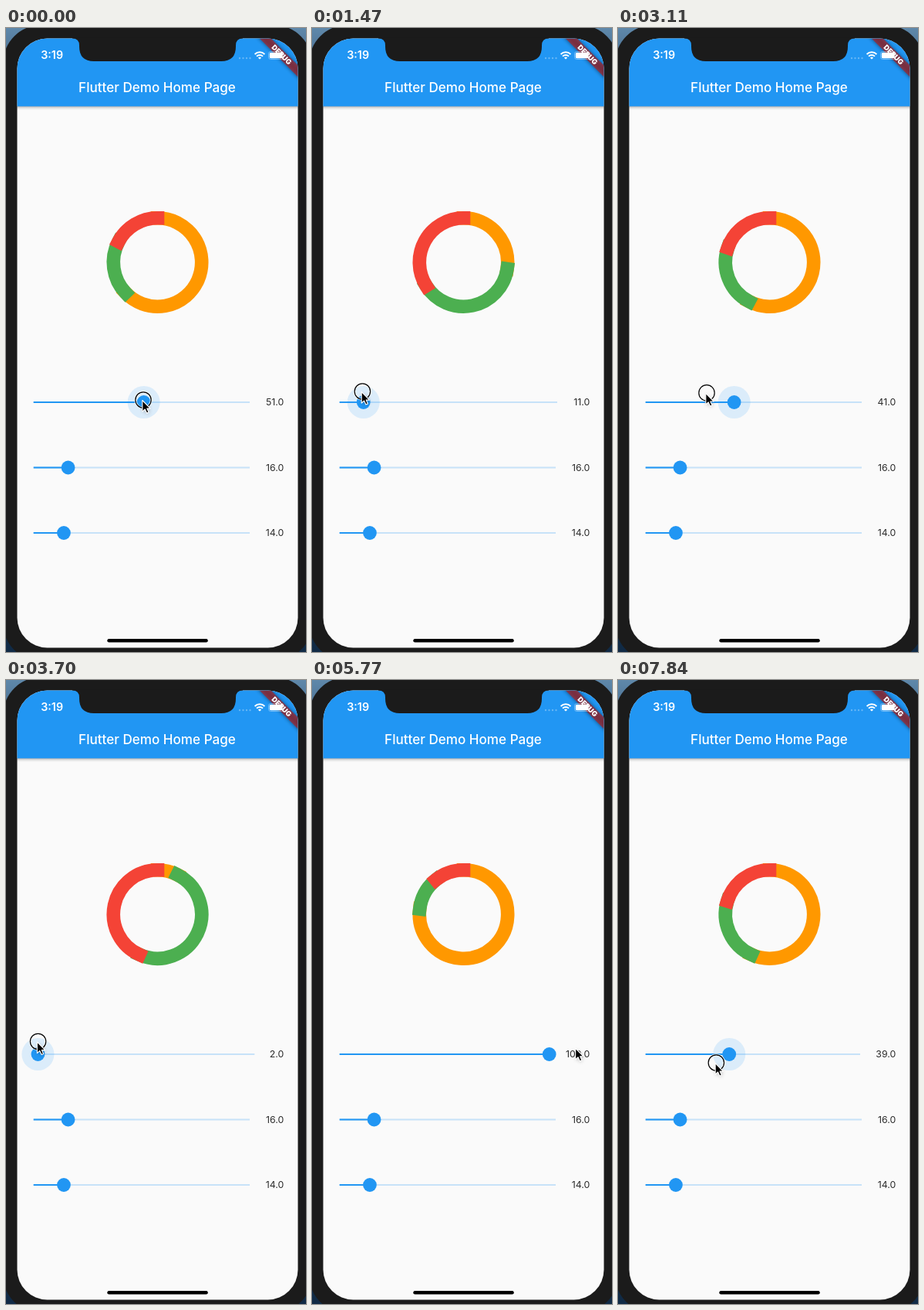
An HTML page for the animation above (7.99 s loop, 389x807 px).

```html
<!DOCTYPE html>
<html lang="en">
<head>
<meta charset="utf-8">
<title>Slider chart demo</title>
<style>
  html, body { margin: 0; width: 100%; height: 100%; overflow: hidden; background: #1b1b1b; }
  svg { display: block; width: 100%; height: 100%; }
  text { font-family: Inter, Roboto, "Liberation Sans", sans-serif; }
  .label { font-size: 12.3px; fill: #2b2b2b; text-anchor: end; }
  .arc { fill: none; stroke-width: 17.6; stroke-linecap: square; }
  .rail { stroke: #c7e2f8; stroke-width: 1.8; }
  .fill { stroke: #2196f3; stroke-width: 1.9; }
</style>
</head>
<body>
<svg id="stage" viewBox="0 0 389 807" xmlns="http://www.w3.org/2000/svg">
  <defs>
    <linearGradient id="desk" x1="0" y1="0" x2="0" y2="1">
      <stop offset="0" stop-color="#5f88aa"/>
      <stop offset=".08" stop-color="#3e6285"/>
      <stop offset="1" stop-color="#102a45"/>
    </linearGradient>
    <linearGradient id="barShade" x1="0" y1="0" x2="0" y2="1">
      <stop offset="0" stop-color="#000" stop-opacity=".32"/>
      <stop offset=".4" stop-color="#000" stop-opacity=".12"/>
      <stop offset="1" stop-color="#000" stop-opacity="0"/>
    </linearGradient>
    <filter id="soft" x="-30%" y="-100%" width="160%" height="300%">
      <feGaussianBlur stdDeviation="2.4"/>
    </filter>
    <clipPath id="screen"><rect x="14.5" y="13.5" width="364" height="788" rx="39"/></clipPath>
    <clipPath id="corner"><rect x="300" y="13.5" width="78.5" height="70"/></clipPath>
  </defs>

  <rect width="389" height="807" fill="url(#desk)"/>
  <rect x="-4" y="-4" width="401" height="823" rx="50" fill="#1b1b1b"/>

  <g clip-path="url(#screen)">
    <rect x="14" y="13" width="365" height="789" fill="#fafafa"/>
    <rect x="14" y="101" width="365" height="5" fill="url(#barShade)"/>
    <rect x="14" y="13" width="365" height="88.3" fill="#2196f3"/>
    <text x="196" y="83" font-size="17.1" font-weight="500" fill="#fff" text-anchor="middle">Flutter Demo Home Page</text>

    <g clip-path="url(#corner)">
      <g transform="translate(378.5 13.5) rotate(45)">
        <rect x="-40" y="24.6" width="80" height="10.6" opacity=".5" filter="url(#soft)"/>
        <rect x="-40" y="24.6" width="80" height="10.6" fill="#b71c1c" fill-opacity=".627"/>
      </g>
    </g>
  </g>

  <path d="M86 12.5V13.5Q95 13.5 95 22.5V24Q95 43 114 43H279Q298 43 298 24V22.5Q298 13.5 307 13.5V12.5Z" fill="#1b1b1b"/>

  <text x="45.2" y="40.4" font-size="14.3" font-weight="600" fill="#fff">3:19</text>
  <g id="dots" fill="#fff" fill-opacity=".3"></g>
  <g transform="translate(329 40)" fill="none" stroke="#fff" stroke-width="2">
    <path d="M-6.4-6A9 9 0 0 1 6.4-6M-4-3.4A5.6 5.6 0 0 1 4-3.4"/>
    <path d="M0 .6L-2.1-1.5A3 3 0 0 1 2.1-1.5Z" fill="#fff" stroke="none"/>
  </g>
  <rect x="340.5" y="30.5" width="19.5" height="10" rx="2.8" fill="none" stroke="#fff" stroke-opacity=".4" stroke-width=".9"/>
  <rect x="341.8" y="31.8" width="16.8" height="7.4" rx="1.7" fill="#fff"/>
  <path d="M361.3 34V37.2Q362.6 36.8 362.6 35.6T361.3 34Z" fill="#fff" fill-opacity=".45"/>
  <g transform="translate(378.5 13.5) rotate(45)">
    <text x="0" y="33.1" font-size="9.2" font-weight="900" fill="#fff" text-anchor="middle">DEBUG</text>
  </g>

  <g id="chart"></g>
  <g id="sliders"></g>
  <rect x="131.3" y="790" width="130.5" height="4.5" rx="2.2" fill="#000"/>

  <g id="pointer">
    <g id="ring" fill="none">
      <circle r="10.2" stroke="#fff" stroke-opacity=".75" stroke-width="3"/>
      <circle r="10.2" stroke="#000" stroke-width="1.2"/>
    </g>
    <g transform="translate(-1.2 .5)">
      <path id="shade" transform="translate(.6 1.4)" d="M0 0V14.6L3.4 11.5L5.7 16.6L8.2 15.5L6 10.6H10.4Z" fill="#000" opacity=".25" filter="url(#soft)"/>
      <path d="M0 0V14.6L3.4 11.5L5.7 16.6L8.2 15.5L6 10.6H10.4Z" fill="#000" stroke="#fff" stroke-width="1.1" stroke-linejoin="round"/>
    </g>
  </g>
</svg>

<script>
const LOOP = 7990, FIRST = 140, STEP = 148.1;
const LEFT = 35.7, RELEASE = 37, PRESS = 47;
const CX = 196.5, CY = 303, R = 57.2;
const FIXED = [16, 14];

// [tick, drag position in percent of the track]
const DRAG = [
  [0, 51], [1, 51.2], [2, 68], [3, 80], [4, 80], [5, 74], [7, 38], [9, 10.3], [10, 11.3],
  [12, 10], [13, 22], [14, 52], [15, 81], [16, 92], [17, 95], [18, 93], [20, 60], [22, 22],
  [23, 8], [24, 2.2], [25, 2.4], [26, 2.4], [27, 13], [28, 34], [30, 82], [31, 102],
  [32, 119], [33, 125], [35, 131], [37, 124], [44, 95.7], [47, 95.7], [49, 80], [51, 57],
  [53, 39.4], [54, 30]
];
// [tick, pointer height]
const HEIGHT = [
  [0, 481], [3, 478], [10, 470], [12, 470], [15, 475.5], [20, 473], [25, 467.5],
  [32, 469.3], [36, 472], [44, 482], [47, 482], [53, 495]
];

const $ = id => document.getElementById(id);

function add(parent, tag, attrs) {
  const el = document.createElementNS("http://www.w3.org/2000/svg", tag);
  set(el, attrs);
  return parent.appendChild(el);
}

function set(el, attrs) {
  for (const key in attrs) el.setAttribute(key, attrs[key]);
}

function track(keys, t) {
  const i = keys.findIndex(k => k[0] > t);
  if (i < 0) return keys[keys.length - 1][1];
  const [t0, a] = keys[i - 1], [t1, b] = keys[i];
  return a + (b - a) * (t - t0) / (t1 - t0);
}

// The rail ends where its proportional label begins.
function railEnd(label) {
  const digits = label.length - 2, ones = label.split("1").length - 1;
  return 314 + 8.3 * (2 - digits) + 2 * ones;
}

const position = (percent, end) => LEFT + percent / 100 * (end - LEFT);

function makeSlider(y) {
  const g = add($("sliders"), "g", { transform: `translate(0 ${y})` });
  const rail = add(g, "line", { class: "rail", x1: LEFT });
  const fill = add(g, "line", { class: "fill", x1: LEFT });
  const halo = add(g, "circle", { r: 21, fill: "#2196f3", "fill-opacity": .14 });
  const thumb = add(g, "circle", { r: 8.9, fill: "#2196f3" });
  const text = add(g, "text", { class: "label", x: 360.2, y: 4.4 });
  return (value, active) => {
    const label = Math.round(value).toFixed(1), end = railEnd(label);
    const x = position(Math.round(value), end);
    set(rail, { x2: end });
    set(fill, { x2: x });
    set(halo, { cx: x, visibility: active ? "visible" : "hidden" });
    set(thumb, { cx: x });
    text.textContent = label;
    return end;
  };
}

function arcPath(from, to) {
  const at = turn => {
    const a = turn * 2 * Math.PI;
    return `${CX + R * Math.sin(a)} ${CY - R * Math.cos(a)}`;
  };
  return `M${at(from)}A${R} ${R} 0 ${to - from > .5 ? 1 : 0} 1 ${at(to)}`;
}

const arcs = ["#ff9800", "#4caf50", "#f44336"].map(stroke => add($("chart"), "path", { class: "arc", stroke }));
const [mainSlider, ...others] = [484, 568.5, 653].map(makeSlider);
others.forEach((slider, i) => slider(FIXED[i], false));
for (let i = 0; i < 4; i++) add($("dots"), "circle", { cx: 303 + i * 4.5, cy: 39, r: 1.2 });

function drawChart(values) {
  const total = values.reduce((a, b) => a + b);
  let from = 0;
  values.forEach((v, i) => {
    const to = from + v / total;
    set(arcs[i], { d: arcPath(from, to) });
    from = to;
  });
}

function render(ms) {
  const tick = ms < FIRST ? 0 : Math.min(53, 1 + Math.floor((ms - FIRST) / STEP + .1));
  const held = tick < RELEASE || tick >= PRESS;
  const value = held ? Math.min(100, track(DRAG, tick)) : 100;
  drawChart([value, ...FIXED]);
  const end = mainSlider(value, held);
  // The pointer runs slightly ahead of the thumb.
  const x = position(track(DRAG, tick + .65), end) - 1;
  set($("pointer"), { transform: `translate(${x} ${track(HEIGHT, tick)})` });
  set($("ring"), { visibility: held ? "visible" : "hidden" });
}

const start = performance.now();
function loop() {
  render((performance.now() - start) % LOOP);
  requestAnimationFrame(loop);
}
loop();
</script>
</body>
</html>
```
